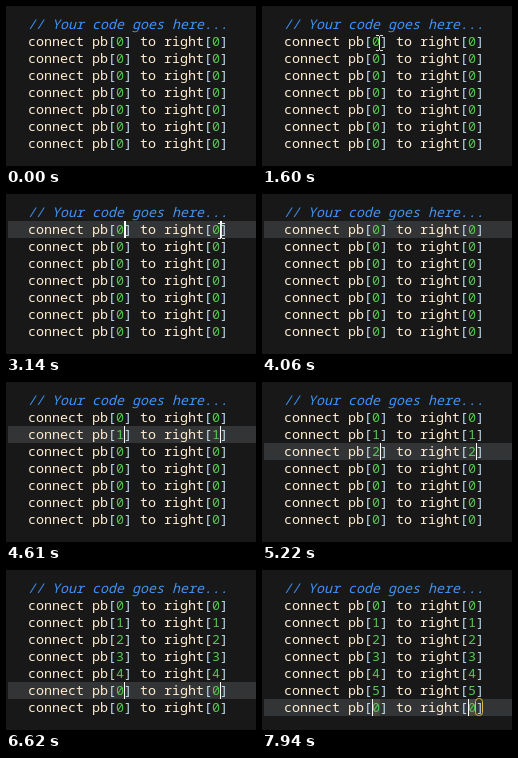
Animation, 250 px wide and 160 px high, one loop 8000 ms. Source, as an HTML page with a canvas:

```html
<!DOCTYPE html>
<html lang="en">
<head>
<meta charset="utf-8">
<title>Multi-cursor editing</title>
<style>
html, body { margin: 0; width: 100%; height: 100%; overflow: hidden; background: #181818; }
canvas { display: block; width: 250px; height: 160px; }
</style>
</head>
<body>
<canvas id="stage" width="250" height="160"></canvas>
<script>
const ctx = document.getElementById('stage').getContext('2d', { alpha: false });

const LOOP = 8000;
const LEFT = 22, CHAR = 8, LINE = 17, TOP = 10, BASE = 13, ROWS = 7;
const FONT = '500 13.33px "Noto Sans Mono", "DejaVu Sans Mono", monospace';
const C = {
  bg: '#181818', active: '#333435', select: '#484842', text: '#ffecd2',
  punct: '#c4e2f4', number: '#58c554', comment: '#4094f4', caret: '#ffffff',
  bracket: '#d9b93c', pointer: '#e4e4e4'
};

// Clicks that place the carets, and the carets' blink
const CLICK = 1830, SECOND_CLICK = 2910, THIN = 3290, BLINK = 620, BLINK_OFF = 4060;

// The carets reach each next row at these times; selecting and typing keep to the beat
const arrivals = [4210, 4840, 5450, 5990, 6620, 7550];
const BEAT = 230;

// Pointer path: time, x, y
const path = [
  [1010, 213, 83], [1370, 110, 29], [1600, 114, 29], [CLICK, 114, 29],
  [2370, 192, 34], [2600, 204, 29], [SECOND_CLICK, 209, 29], [3140, 212, 29], [3450, 218, 24]
];
const POINTER_STEP = 77;

const colX = col => LEFT + col * CHAR;
const rowY = row => TOP + row * LINE;

function box(color, x, y, w, h) {
  ctx.fillStyle = color;
  ctx.fillRect(x, y, w, h);
}

function write(str, col, row, color) {
  ctx.fillStyle = color;
  [...String(str)].forEach((ch, i) => ctx.fillText(ch, colX(col + i), rowY(row) + BASE));
}

function editorState(t) {
  const s = { row: 0, typed: 0, carets: [], caretWidth: t < THIN ? 2 : 1, selected: false };
  if (t < CLICK) return s;
  s.row = 1;
  if (t < CLICK + BLINK) s.carets = [12];
  else if (t >= SECOND_CLICK && t < BLINK_OFF) s.carets = [12, 24];

  const i = arrivals.filter(a => a <= t).length - 1;
  if (i >= 0) {
    const next = arrivals[i + 1] || Infinity;
    const done = t >= next - BEAT;
    s.row = i + 2;
    s.typed = done ? i + 1 : i;
    s.selected = !done && t >= arrivals[i] + BEAT;
    s.carets = s.selected ? [11, 23] : [12, 24];
  }
  return s;
}

function pointerAt(t) {
  const i = path.findIndex(p => p[0] > t);
  if (i < 1) return null;
  const a = path[i - 1], b = path[i];
  const span = b[0] - a[0];
  const steps = Math.round(span / POINTER_STEP);
  const u = Math.floor((t - a[0]) / span * steps + 0.05) / steps;
  return [1, 2].map(k => Math.round(a[k] + (b[k] - a[k]) * u));
}

function drawPointer([x, y]) {
  for (const end of [y, y + 15]) {
    box(C.pointer, x, end, 3, 1);
    box(C.pointer, x + 4, end, 3, 1);
  }
  box(C.pointer, x + 3, y + 1, 1, 14);
}

function drawCode(typed) {
  ctx.font = 'italic ' + FONT;
  write('// Your code goes here...', 0, 0, C.comment);
  ctx.font = FONT;
  for (let row = 1; row <= ROWS; row++) {
    const digit = row - 1 <= typed ? row - 1 : 0;
    write('connect pb', 0, row, C.text);
    write('to right', 14, row, C.text);
    for (const col of [10, 22]) {
      write('[', col, row, C.punct);
      write(digit, col + 1, row, C.number);
      write(']', col + 2, row, C.punct);
    }
  }
}

function drawBracketMark(y) {
  ctx.strokeStyle = C.bracket;
  ctx.lineWidth = 1;
  ctx.beginPath();
  ctx.roundRect(colX(24) - 0.5, y - 0.5, CHAR - 1, LINE, 3);
  ctx.stroke();
}

function draw(t) {
  const s = editorState(t);
  const y = rowY(s.row);
  box(C.bg, 0, 0, 250, 160);
  if (s.row) box(C.active, 2, y, 248, LINE);
  if (s.selected) s.carets.forEach(col => box(C.select, colX(col), y, CHAR, LINE));
  drawCode(s.typed);
  if (s.selected) drawBracketMark(y);
  s.carets.forEach(col => box(C.caret, colX(col), y, s.caretWidth, LINE));
  const pointer = pointerAt(t);
  if (pointer) drawPointer(pointer);
}

const begin = performance.now();
function tick() {
  draw((performance.now() - begin) % LOOP);
  requestAnimationFrame(tick);
}
tick();
</script>
</body>
</html>
```
